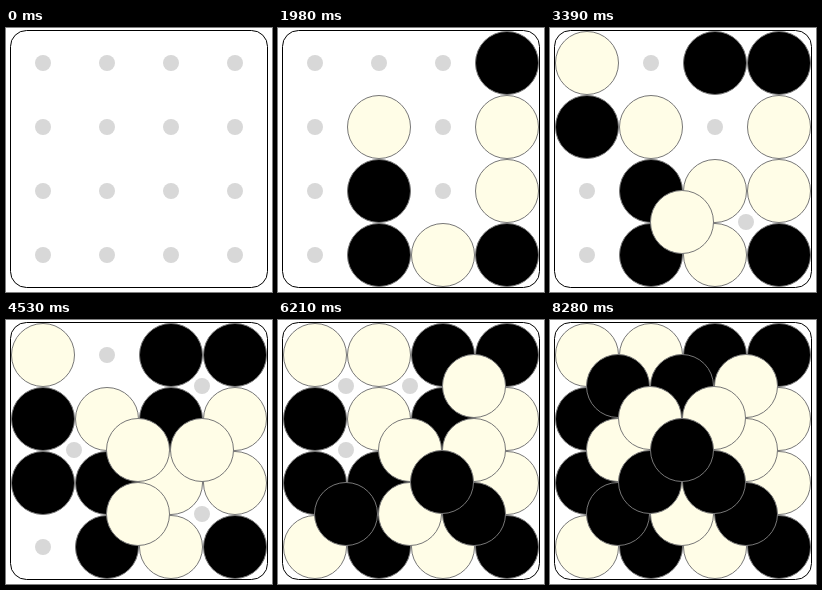
Animation, 266 px wide and 264 px high, one loop 8.61 s. Source, as an HTML page with a canvas:

```html
<!DOCTYPE html>
<html lang="en">
<head>
<meta charset="utf-8">
<title>Ball pyramid</title>
<style>
  html, body { margin: 0; width: 100%; height: 100%; overflow: hidden; background: #fff; }
  canvas { display: block; }
</style>
</head>
<body>
<canvas id="board" width="266" height="264"></canvas>
<script>
const ctx = document.getElementById('board').getContext('2d');
const LOOP = 8610;

// Each move: time in ms, then column, row and level. Cream starts, colours alternate.
const moves = [
  [30, '310'], [330, '130'], [600, '110'], [900, '300'], [1170, '320'],
  [1440, '330'], [1710, '230'], [1980, '120'], [2280, '220'], [2550, '010'],
  [2850, '121'], [3120, '200'], [3390, '000'], [3690, '210'], [3960, '111'],
  [4230, '020'], [4530, '211'], [4800, '221'], [5100, '030'], [5370, '112'],
  [5640, '100'], [5940, '021'], [6210, '201'], [6480, '101'], [6780, '011'],
  [7050, '001'], [7320, '002'], [7620, '012'], [7890, '102'], [8160, '003']
];

function circle(x, y, r, fill, stroke) {
  ctx.beginPath();
  ctx.arc(x, y, r, 0, 2 * Math.PI);
  ctx.fillStyle = fill;
  ctx.fill();
  if (stroke) {
    ctx.strokeStyle = stroke;
    ctx.stroke();
  }
}

function drawBoard() {
  ctx.fillStyle = '#fff';
  ctx.fillRect(0, 0, 266, 264);
  ctx.beginPath();
  ctx.roundRect(4.5, 2.5, 257, 257, 16);
  ctx.strokeStyle = '#000';
  ctx.stroke();
}

function draw(time) {
  const balls = {};
  moves.forEach(([start, cell], i) => {
    if (time >= start) balls[cell] = i % 2 ? '#000' : '#fffde7';
  });
  const filled = (col, row, level) => `${col}${row}${level}` in balls;
  const supported = (col, row, level) => level === 0 ||
    [0, 1].every(dx => [0, 1].every(dy => filled(col + dx, row + dy, level - 1)));

  drawBoard();
  for (let level = 0; level < 4; level++) {
    const shift = level ? 32 * level - 1 : 0;
    for (let row = 0; row < 4 - level; row++) {
      for (let col = 0; col < 4 - level; col++) {
        const x = 37 + 64 * col + shift;
        const y = 35 + 64 * row + shift;
        if (filled(col, row, level)) circle(x, y, 31.5, balls[`${col}${row}${level}`], '#777');
        else if (supported(col, row, level)) circle(x, y, 8, '#d8d8d8');
      }
    }
  }
}

function tick() {
  draw(performance.now() % LOOP);
  requestAnimationFrame(tick);
}
tick();
</script>
</body>
</html>
```
